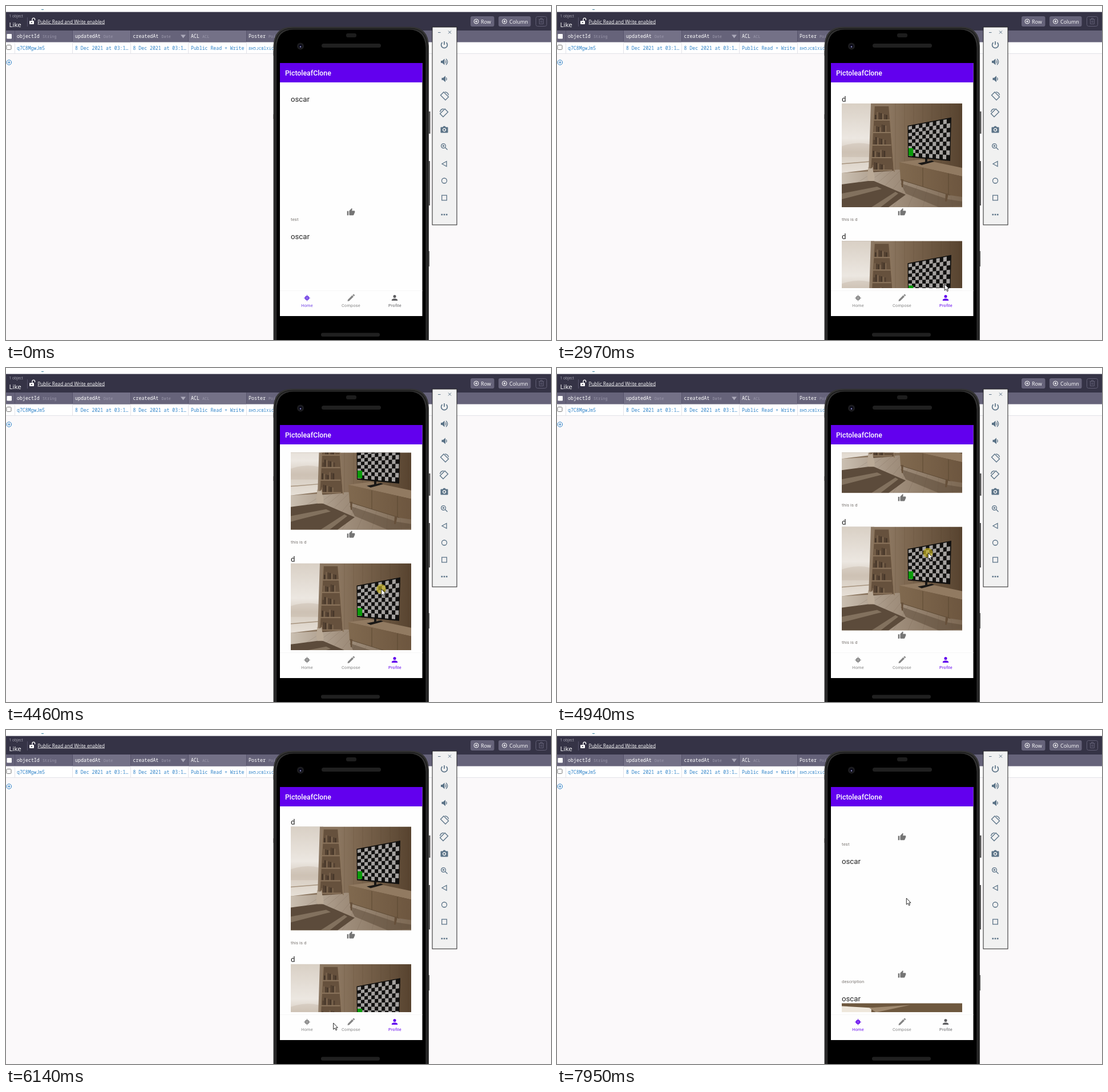
These frames come from a looping animation (955x586 px, 8000 ms). An HTML page:

```html
<!DOCTYPE html>
<html lang="en">
<head>
<meta charset="utf-8">
<title>Feed demo</title>
<style>
html, body { margin: 0; width: 100%; height: 100%; overflow: hidden; }
svg { display: block; width: 955px; height: 586px; }
text { white-space: pre; }
.ui { font-family: "Open Sans", "Noto Sans", sans-serif; fill: #fff; }
.mono { font: 8.2px "Noto Sans Mono", "DejaVu Sans Mono", monospace; fill: #2f83c8; }
.head { font-size: 8.3px; font-weight: 500; fill: #fff; }
.type { font-size: 6.8px; font-weight: 400; fill: #9c99ac; }
.app { font-family: Roboto, "Noto Sans", sans-serif; }
.name { font-size: 13.2px; fill: #222; }
.note { font-size: 7.6px; letter-spacing: .15px; fill: #7a7571; }
.tab text { font-size: 7.4px; letter-spacing: .2px; text-anchor: middle; }
.line { fill: none; stroke: #5b7387; stroke-width: 1.3; }
</style>
</head>
<body>
<svg viewBox="0 0 955 586">
<defs>
  <linearGradient id="wall"><stop offset=".4" stop-color="#8b7660"/><stop offset=".55" stop-color="#7d6750"/><stop offset="1" stop-color="#57432f"/></linearGradient>
  <linearGradient id="glass" x2="0" y2="1"><stop offset="0" stop-color="#d9d0c5"/><stop offset=".5" stop-color="#ece7e1"/><stop offset=".7" stop-color="#d6ccc0"/><stop offset="1" stop-color="#e6dfd6"/></linearGradient>
  <linearGradient id="floor"><stop offset="0" stop-color="#cabfb1"/><stop offset=".4" stop-color="#a39280"/><stop offset="1" stop-color="#7c6853"/></linearGradient>
  <linearGradient id="wood"><stop offset="0" stop-color="#80694f"/><stop offset="1" stop-color="#6d563f"/></linearGradient>
  <clipPath id="pic"><rect width="211" height="182"/></clipPath>
  <clipPath id="view"><rect x="480" y="148.500" width="250" height="346.500"/></clipPath>
  <clipPath id="bar"><rect x="480" y="499" width="250" height="38"/></clipPath>
  <path id="thumb" transform="scale(.62) translate(-12 -11)" fill="#757575" d="M1 21h4V9H1zM23 10c0-1.100-.9-2-2-2h-6.300l.9-4.600c.1-.5-.1-1-.4-1.400L14.200 1 7.600 7.600C7.200 8 7 8.500 7 9v10c0 1.100.9 2 2 2h9c.8 0 1.500-.5 1.800-1.200l3-7c.1-.3.2-.5.2-.8z"/>
  <g id="room" clip-path="url(#pic)">
    <path fill="url(#wall)" d="M0 0h211v182H0z"/>
    <path id="planks" stroke="#4d3b2b" stroke-opacity=".18" fill="none"/>
    <path fill="url(#floor)" d="M0 122 100 116 211 150V182H0z"/>
    <path id="boards" stroke="#6b5845" stroke-opacity=".2" fill="none"/>
    <path fill="url(#glass)" d="M0 0H52L48 116 0 122z"/>
    <path fill="#b9aa99" opacity=".3" d="M0 75q25-9 50-3v22H0z"/>
    <path stroke="#a6937e" stroke-width="1.500" d="M0 106 49 102" fill="none"/>
    <path fill="#8c7863" d="M51 0h6l-6 120h-4z"/>
    <path fill="#66513d" d="M57 5H83L91 118 50 121z"/>
    <g id="shelves"/>
    <path fill="none" stroke="#8b755d" stroke-width="1.800" d="M57 4 50 122M83 4 92 120"/>
    <path fill="#5c4b3b" d="M0 142 54 135 112 160 82 182H0z"/>
    <path fill="#9c8a75" opacity=".6" d="M0 158 62 146 70 150 0 168zM52 182 94 155 99 158 68 182z"/>
    <path fill="#baaa97" d="M46 111l2 3h4l2-3 1 8q4 10 2 17H47q-4-7-1-17z"/>
    <path fill="#52402f" opacity=".45" d="M103 140 186 168 211 172V180L170 182 112 158z"/>
    <path fill="#917a61" d="M101 103 140 98 211 113V128z"/>
    <path fill="url(#wood)" d="M101 103 211 128V164L190 161 103 134z"/>
    <path fill="none" stroke="#57442f" stroke-width=".8" d="M142 113V146M187 123V160M103 134 190 161"/>
    <path fill="#66503a" d="M104 133h4l-1 14h-2zM182 158h5l-3 14h-3z"/>
    <path fill="#1a1816" d="M133 105 158 100 162 102 140 108zM146 94h4v10h-4z"/>
    <path fill="#11100f" d="M115.500 39 192 24.500 190 101 116 94z"/>
    <g id="checks"/>
  </g>
</defs>

<path fill="#fbf9fa" d="M0 0h955v586H0z"/>
<path fill="#fff" d="M0 0h955v11H0zM0 63h955v20H0z"/>
<path stroke="#4d8fa8" stroke-width="1.200" d="M62 6.300h4"/>
<path fill="#353346" d="M0 10.600h955V43H0z"/>
<path fill="#66637a" d="M0 43h955v20.500H0z"/>
<path fill="#747187" d="M117 43h101v20.500H117zM320 43h101v20.500H320z"/>
<path stroke="#e2e2e8" d="M0 83.500H955M15.500 63.500V83M116.500 63.500V83M218.500 63.500V83M319.500 63.500V83M421.500 63.500V83"/>
<path stroke="#55526a" d="M15.500 43V63M116.500 43V63M218.500 43V63M319.500 43V63M421.500 43V63M37.500 20V36"/>
<g class="ui">
  <text x="5.500" y="20" font-size="6.600" fill="#aaa8b5">1 object</text>
  <text x="5.500" y="37" font-size="11.600">Like</text>
  <text x="55.500" y="30.500" font-size="8.250" text-decoration="underline">Public Read and Write enabled</text>
  <rect x="41" y="26" width="8" height="6" rx="1"/>
  <path fill="none" stroke="#fff" stroke-width="1.300" d="M46 26V23.500a2.300 2.300 0 0 1 4.600 0V25"/>
  <circle cx="45" cy="29" r="1" fill="#353346"/>
  <rect x="814" y="18" width="41.500" height="18" rx="3" fill="#66637a"/>
  <rect x="863" y="18" width="56.500" height="18" rx="3" fill="#66637a"/>
  <text x="832" y="30.500" font-size="9">Row</text>
  <text x="882" y="30.500" font-size="9">Column</text>
  <path fill="none" stroke="#fff" d="M820 27a4 4 0 1 0 8 0a4 4 0 1 0-8 0M822 27h4M824 25v4M869.500 27a4 4 0 1 0 8 0a4 4 0 1 0-8 0M871.500 27h4M873.500 25v4"/>
  <rect x="928.500" y="18.500" width="19" height="17" rx="3" fill="none" stroke="#615e74"/>
  <path fill="none" stroke="#615e74" d="M933.500 23.500h9M936.500 23v-1.500h3V23M934.500 24v7.500h7V24M937 25.500v4M939 25.500v4"/>
  <rect x="1.500" y="49" width="8.500" height="8.500" rx="1"/>
</g>
<rect x="1" y="68.500" width="8" height="8" rx="1.500" fill="#fff" stroke="#777"/>
<path fill="none" stroke="#2f83c8" d="M1 99a4.300 4.300 0 1 0 8.600 0a4.300 4.300 0 1 0-8.600 0M3 99h4.600M5.300 96.700v4.600"/>
<path fill="#aaa8b8" d="M306 50.500h9l-4.500 6z"/>
<g id="table"></g>

<g id="phone">
  <path fill="#555" d="M468.500 79h3v8h-3zM468.500 190h3v8h-3zM738 79h3v8h-3zM740 185h3.500v39H740zM740 272h3v78h-3zM739 430h3v27h-3z"/>
  <path fill="#333" d="M468.500 586V70Q469.500 37 500 36.500H710Q740 37 741 70V586z"/>
  <path fill="none" stroke="#1b1b1b" stroke-width="1.500" d="M471.500 586V71Q472 40 502 39.500H708Q737 40 738 71V586"/>
  <path fill="#000" d="M474 586V73Q475 42 503 41.500H707Q734 42 735.500 73V586z"/>
  <rect x="596" y="48" width="18" height="7" rx="3" fill="#1d1d1d"/>
  <rect x="553" y="66" width="104" height="7" rx="3.500" fill="#202020"/>
  <rect x="552" y="573.500" width="103" height="6.500" rx="3" fill="#202020"/>
  <circle cx="516" cy="70.500" r="6" fill="#1c1c1f"/>
  <circle cx="516" cy="70.500" r="3" fill="#09091a"/>
  <circle cx="516" cy="71.500" r="1.200" fill="#8a8abb"/>
  <path fill="#fefefe" d="M480 100h249.500v444H480z"/>
  <path fill="#6200ee" d="M480 100h249.500v34H480z"/>
</g>
<g class="app">
  <text x="489" y="121.800" font-size="12.300" font-weight="500" fill="#fff">PictoleafClone</text>
  <g clip-path="url(#view)"><g id="home"></g><g id="profile"></g></g>
  <path stroke="#f6f6f6" d="M480 499.500H729.500"/>
  <circle id="ripple" cy="519" fill="#6200ee" clip-path="url(#bar)"/>
  <g class="tab" id="tabHome">
    <circle cx="527.500" cy="512.300" r="3.800"/>
    <path fill="none" stroke="currentColor" d="M522 512.300h11M527.500 506.800v11"/>
    <path fill="none" stroke="#fff" stroke-opacity=".45" stroke-width=".7" d="M525 512.300h5M527.500 509.800v5"/>
    <text x="527.600" y="528">Home</text>
  </g>
  <g class="tab" fill="#858585">
    <path d="M599 515.200 606.600 507.600 609 510 601.400 517.600 598.500 518zM607.300 507l1-1q.8-.7 1.600 0l.8.8q.6.700 0 1.500l-1 1z"/>
    <text x="604.500" y="528">Compose</text>
  </g>
  <g class="tab" id="tabProfile">
    <path transform="translate(681 512) scale(.64) translate(-12 -12)" d="M12 12a4 4 0 1 0 0-8a4 4 0 1 0 0 8zm0 2c-2.700 0-8 1.300-8 4v2h16v-2c0-2.700-5.300-4-8-4z"/>
    <text x="681.500" y="528">Profile</text>
  </g>
</g>

<rect x="747" y="37" width="43" height="347" fill="#f1f1f1" stroke="#222"/>
<g class="line">
  <path stroke-width="1" d="M757 46.500h4.500M775 43.500l5 5M780 43.500l-5 5"/>
  <path stroke-width="1.700" d="M764.500 64.200a5.400 5.400 0 1 0 7 0M768 62v6"/>
  <path fill="#5b7387" stroke="none" d="M762 96h2.500l4-3.500v11l-4-3.500H762zM763.500 126h2.500l4-3.500v11l-4-3.500h-2.500z"/>
  <path d="M770.200 95.500q2 2.500 0 5M771 92.800q5.500 5.200 0 10.400M771.300 125.500q1.700 2.500 0 5"/>
  <g id="rot">
    <path d="M761.500 156.500 767 151 775.500 159.500 770 165zM769 150.800q5.500.2 6.500 5.700"/>
  </g>
  <use href="#rot" transform="matrix(-1 0 0 1 1536 29.500)"/>
  <path fill="#5b7387" stroke="none" fill-rule="evenodd" d="M762.500 212.500h3l1-1.800h3l1 1.800h3q1 0 1 1v8q0 1-1 1h-11q-1 0-1-1v-8q0-1 1-1zM768 214a3.200 3.200 0 1 0 .1 0zM768 215.500a1.700 1.700 0 1 1-.1 0z"/>
  <path d="M762.600 245.500a3.900 3.900 0 1 0 7.800 0a3.900 3.900 0 1 0-7.800 0M769.500 248.200l4 4M764.700 245.500h3.600M766.500 243.700v3.600M772 272.500V281.500L764 277zM763.500 306.500a4.500 4.500 0 1 0 9 0a4.500 4.500 0 1 0-9 0M763.700 332.200h8.600v8.600h-8.600z"/>
  <path fill="#5b7387" stroke="none" d="M762.500 364.700h2.600v2.600h-2.600zM766.700 364.700h2.600v2.600h-2.600zM770.900 364.700h2.600v2.600h-2.600z"/>
</g>
<g id="cursor">
  <circle id="press" r="8.500" fill="#c9b51e" opacity=".66"/>
  <path fill="#fff" stroke="#111" stroke-width=".9" d="M.3 0V11.200L2.900 8.900 4.700 12.800 6.500 12 4.800 8.200H8z"/>
</g>
</svg>
<script>
const $ = id => document.getElementById(id);
const fill = (id, html) => $(id).innerHTML = html;
const range = (n, f) => Array.from({ length: n }, (_, i) => f(i)).join("");

// Table
const columns = [
  [19, "objectId", "String", "q7C8MgwJm5"],
  [121, "updatedAt", "Date", "8 Dec 2021 at 03:1…"],
  [222.5, "createdAt", "Date", "8 Dec 2021 at 03:1…"],
  [324, "ACL", "ACL", "Public Read + Write"],
  [425, "Poster", "Pointer", "8H5JCBlXiC"]
];
fill("table", columns.map(([x, name, type, value], i) =>
  `<text class="mono head" x="${x}" y="56.300">${name}</text>
   <text class="mono type" x="${x + name.length * 5 + 5}" y="56">${type}</text>
   <text class="mono" x="${x}" y="76.500" ${i > 3 ? 'style="font-size:7.400px"' : ""}>${value}</text>`).join(""));

// Room picture
$("planks").setAttribute("d", range(8, i => `M${94 + i * 16} 0V130`));
$("boards").setAttribute("d", range(12, i => `M${i * 26 - 40} 182L${60 + i * 14} 118`));
fill("shelves", range(5, i => {
  const y = 28 + i * 22, left = 55 - i * 1.2, wide = 30 + i * 2;
  const books = range(7, k => {
    const h = 8 + (k * 5 + i * 3) % 6;
    return `<path fill="${["#453629", "#77614b", "#524031"][(k + i) % 3]}" d="M${left + 3 + k * 3.2} ${y - h}h2.600v${h}h-2.600z"/>`;
  });
  return `${books}<path fill="#8b755d" d="M${left} ${y}h${wide}v2h${-wide}z"/>`;
}));
const COLS = 12, ROWS = 9;
const tv = (u, v) => {
  const top = 40.5 - 14 * u, bottom = 92 + 6.5 * u;
  return `${117 + 73 * u - u * v} ${top + (bottom - top) * v}`;
};
const cell = (c, r, w, h, color) => {
  const [left, right, top, bottom] = [c / COLS, (c + w) / COLS, r / ROWS, (r + h) / ROWS];
  return `<path fill="${color}" d="M${tv(left, top)}L${tv(right, top)} ${tv(right, bottom)} ${tv(left, bottom)}z"/>`;
};
fill("checks", range(COLS * ROWS, i => {
  const c = i % COLS, r = i / COLS | 0;
  return (c + r) % 2 ? "" : cell(c, r, 1, 1, "#a5a2a0");
}) + cell(0, 6.6, 1.35, 2.3, "#0a9c0a"));

// Feeds
const post = (i, user, note, picture) => `<g transform="translate(499 ${171 + i * 241.2})">
  <text class="name" y="-3.300">${user}</text>${picture}
  <use href="#thumb" x="105.500" y="190"/><text class="note" y="206">${note}</text></g>`;
const room = '<use href="#room"/>';
const sill = '<path fill="#6e583f" d="M0 0h211v60H0z"/><path fill="#eee7dc" d="M0 5 52 8 50 60H0z"/><path fill="#a08a70" d="M48 8 120 3 60 16z"/>';
fill("home", post(0, "oscar", "test", "") + post(1, "oscar", "description", "") + post(2, "oscar", "photo", sill));
fill("profile", range(3, i => post(i, "d", "this is d", room)));

// Keys are [ms, value, ...], linear between neighbours
function track(keys, t) {
  const i = keys.findIndex(k => k[0] > t);
  if (i < 0) return keys.at(-1).slice(1);
  if (i === 0) return keys[0].slice(1);
  const a = keys[i - 1], b = keys[i], p = (t - a[0]) / (b[0] - a[0]);
  return a.slice(1).map((v, k) => v + (b[k + 1] - v) * p);
}
const path = [
  [690, 938, 578], [900, 850, 560], [1130, 745, 538], [1370, 696, 528], [1440, 696, 528], [1510, 692, 526],
  [1710, 692, 526], [1780, 687, 523], [2700, 687, 523], [2970, 679, 488], [3180, 671, 463],
  [3580, 671, 463], [3750, 664, 458], [4190, 661, 415], [4320, 659, 402], [4390, 659, 402],
  [4800, 650, 320], [4930, 650, 320], [4940, 650, 324], [5270, 651, 405], [5740, 648, 447],
  [5940, 648, 447], [6140, 573.5, 514], [6470, 532, 525], [6950, 532, 525], [7420, 612, 469], [7490, 612, 469], [7950, 612, 295]
];
const profileScroll = [[3750, 0], [4190, 42], [4320, 55], [4390, 55], [4800, 138], [4930, 138], [4940, 134], [5270, 53], [5740, 1.5]];
const homeScroll = [[7490, 0], [7950, 174]];
const presses = [[2380, 2500], [3580, 5940], [6670, 6790], [7420, 7920]];
const OPEN = 2560, BACK = 6850;
const show = (id, on) => $(id).style.display = on ? "" : "none";
const tint = (id, color) => { $(id).style.fill = color; $(id).style.color = color; };

function frame(now) {
  const t = now % 8000, onProfile = t >= OPEN && t < BACK;
  show("home", !onProfile);
  show("profile", onProfile);
  $("home").setAttribute("transform", `translate(0 ${-track(homeScroll, t)})`);
  $("profile").setAttribute("transform", `translate(0 ${-track(profileScroll, t)})`);
  tint("tabHome", onProfile ? "#858585" : t < OPEN ? "#7040e4" : "#6a10ee");
  tint("tabProfile", onProfile ? "#6200ee" : "#5f5f62");

  const tap = t > 6000 ? 6700 : 2400, p = (t - tap) / 420;
  show("ripple", p > 0 && p < 1);
  $("ripple").setAttribute("cx", t > 6000 ? 527.5 : 681.5);
  $("ripple").setAttribute("r", 38 * Math.min(1, Math.max(0, p) * 2));
  $("ripple").setAttribute("opacity", .14 * Math.max(0, Math.min(1, 2 - 2 * p)));

  show("cursor", t >= 690);
  $("cursor").setAttribute("transform", `translate(${track(path, t)})`);
  show("press", presses.some(([a, b]) => t >= a && t < b));
  requestAnimationFrame(frame);
}
requestAnimationFrame(frame);
</script>
</body>
</html>
```
